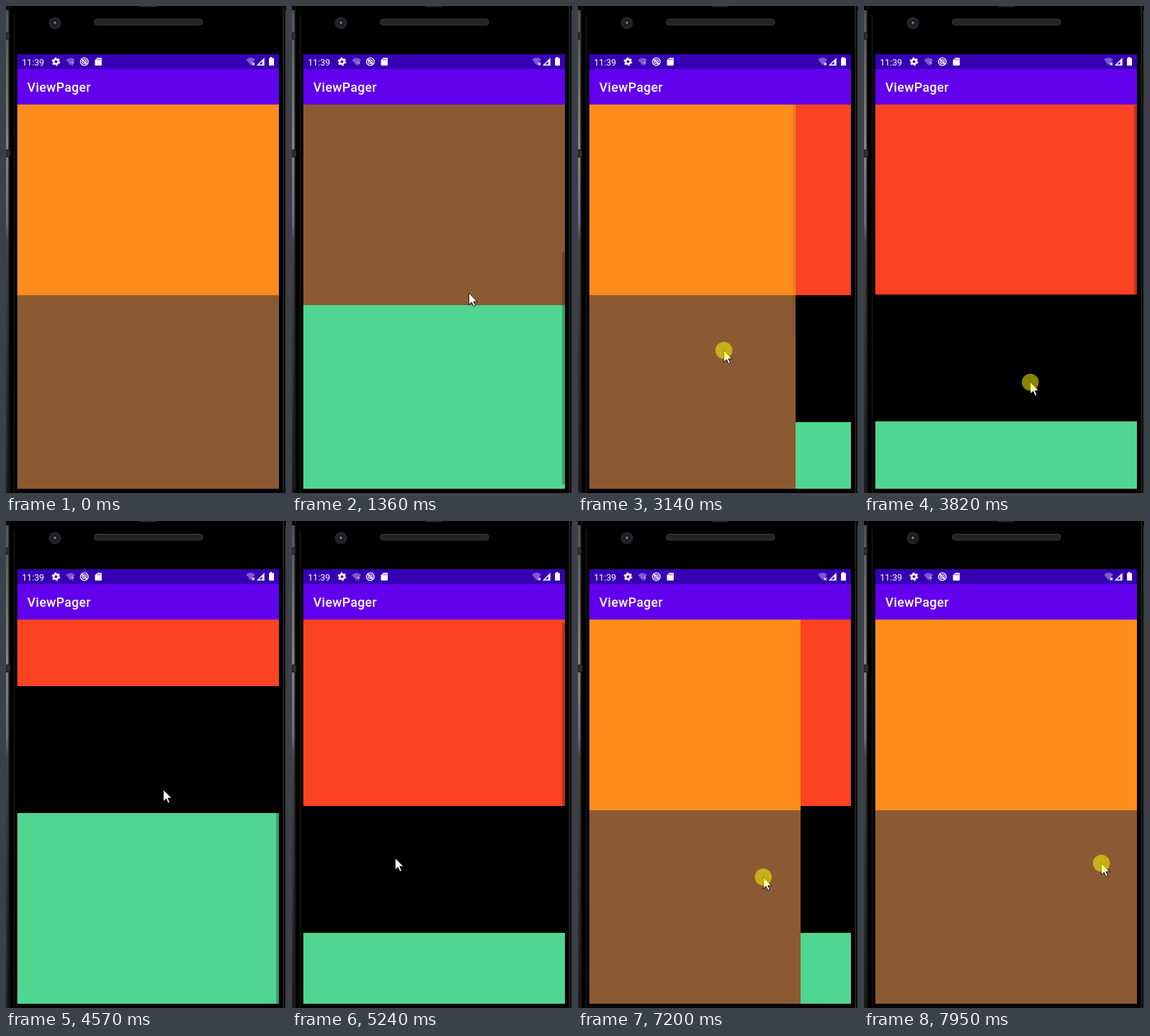
Recreate the animation shown at these times as an HTML page. Size 395x687 px, loop 8000 ms.

```html
<!DOCTYPE html>
<html lang="en">
<head>
<meta charset="utf-8">
<title>ViewPager</title>
<style>
html, body { margin: 0; width: 100%; height: 100%; overflow: hidden; background: #000; }
svg { display: block; width: 395px; height: 687px; }
text { font-family: Roboto, sans-serif; fill: #fff; }
</style>
</head>
<body>
<svg viewBox="0 0 395 687">
  <defs>
    <linearGradient id="side" x2="0" y2="1">
      <stop offset="0" stop-color="#555"/>
      <stop offset=".28" stop-color="#858585"/>
      <stop offset=".44" stop-color="#6c6a7a"/>
      <stop offset=".48" stop-color="#444"/>
      <stop offset="1" stop-color="#1c1c1c"/>
    </linearGradient>
    <radialGradient id="lens">
      <stop offset="0" stop-color="#55555f"/>
      <stop offset=".35" stop-color="#16161c"/>
      <stop offset=".7" stop-color="#26262b"/>
      <stop offset="1" stop-color="#1b1b1e"/>
    </radialGradient>
    <clipPath id="screen"><path d="M16 139h369v542H16z"/></clipPath>
  </defs>

  <!-- phone body -->
  <rect width="395" height="687"/>
  <rect y="6" width="3.5" height="681" fill="url(#side)"/>
  <path d="M4.5 0V687M11.5 12V687" stroke="#202020"/>
  <path d="M0 38h5v9H0zM0 203h6v10H0z" fill="#303030" stroke="#111"/>
  <path d="M391.5 0V687" stroke="#242424" stroke-width="2"/>
  <path d="M394.5 6V687" stroke="#3c3c3c"/>
  <rect x="189" width="23" height="1.5" fill="#2a2a2a"/>
  <circle cx="69" cy="24" r="9" fill="url(#lens)"/>
  <circle cx="69" cy="23.500" r="1.3" fill="#9a9aa4"/>
  <rect x="124.5" y="18.500" width="153" height="8.500" rx="4" fill="#242424" stroke="#3a3a3a"/>

  <!-- bars -->
  <rect x="16" y="68" width="369" height="21" fill="#3700b3"/>
  <rect x="16" y="89" width="369" height="50" fill="#6200ee"/>
  <text x="22.500" y="83.500" font-size="12.600">11:39</text>
  <text x="30" y="121" font-size="18" font-weight="500" letter-spacing=".35">ViewPager</text>

  <!-- status icons -->
  <g fill="none" stroke="#fff">
    <circle cx="70.500" cy="78.500" r="3.300" stroke-width="2.600"/>
    <circle cx="70.500" cy="78.500" r="5.200" stroke-width="1.600" stroke-dasharray="2.700 2.745"/>
    <circle cx="110.500" cy="78.500" r="5.400" stroke-width="1.400"/>
    <circle cx="110.500" cy="78.500" r="2.700" stroke-width="1.200"/>
    <path d="M107 75l7 7" stroke-width="1.500"/>
  </g>
  <path d="M84.500 76Q91 70.500 97.500 76L91 84z" fill="#fff" opacity=".35"/>
  <text x="92" y="84" font-size="8" font-weight="500">?</text>
  <path d="M129 73h5q1 0 1 1v9q0 1-1 1h-7.500q-1 0-1-1v-6.500z" fill="#fff"/>
  <path d="M129 74.500v2M131 74.500v2M133 74.500v2" stroke="#3700b3" stroke-width=".9"/>
  <path d="M338.500 75.500Q345 70 351.500 75.500L345 83.500z" fill="#fff" opacity=".35"/>
  <path d="M347 80l3.500 3.500m0-3.500L347 83.500" stroke="#fff" stroke-width="1.200"/>
  <path d="M364.500 73V84H353.500z" fill="#fff"/>
  <path d="M361.500 78v4.500H357z" fill="#3700b3"/>
  <path d="M371 73.500h1.500V72h3v1.500H378V84h-7z" fill="#fff"/>

  <g id="pages" clip-path="url(#screen)"></g>

  <path id="arrow" d="M0 0V16.500L3.900 12.900 6.600 19 9.200 17.900 6.500 12H11.800z" fill="#fff" stroke="#000" stroke-width=".9"/>
  <circle id="touch" r="12" fill="#ff0" opacity=".52"/>
</svg>

<script>
const LOOP = 8000, TOP = 139, LEFT = 16, VIEW_W = 369, VIEW_H = 542;
const DP = VIEW_W / 411.43;                // pixels per Android dp
const SLOP = 8, SETTLE = 420, BAR_DELAY = 300, BAR_FADE = 250;

const $ = id => document.getElementById(id);
const clamp = (v, lo, hi) => Math.min(hi, Math.max(lo, v));
const mix = (a, b, k) => a + (b - a) * k;
const easeOut = k => 1 - (1 - clamp(k, 0, 1)) ** 4;
const move = (el, x, y) => el.setAttribute("transform", `translate(${x} ${y})`);

function add(parent, tag, attrs = {}) {
  const el = document.createElementNS("http://www.w3.org/2000/svg", tag);
  for (const key in attrs) el.setAttribute(key, attrs[key]);
  return parent.appendChild(el);
}

function makePage(...blocks) {
  const el = add($("pages"), "g"), content = add(el, "g");
  let total = 0;
  for (const [fill, dp] of blocks) {
    const height = dp * DP;
    add(content, "rect", { y: total, width: VIEW_W, height, fill, "shape-rendering": "crispEdges" });
    total += height;
  }
  const thumb = add(el, "rect", { x: VIEW_W - 4, width: 4, height: VIEW_H ** 2 / total });
  return { el, content, thumb, total, axis: 1, max: total - VIEW_H };
}

const first = makePage(["#ff8c1b", 300], ["#8b5a32", 400], ["#50d690", 300]);
const second = makePage(["#fb4223", 300], ["#000", 200], ["#50d690", 300]);
const pager = { axis: 0, max: VIEW_W };

// Each drag: what it moves, start and end time, start and end point, resting value after release.
const drag = (what, start, end, from, to, rest) => ({ what, start, end, from, to, rest });
const drags = [
  drag(first, 740, 1150, [266, 498], [255, 296], first.max),
  drag(first, 2000, 2250, [247, 456], [284.5, 639], 0),
  drag(pager, 2930, 3280, [292, 490], [149, 483], VIEW_W),
  drag(second, 3800, 4200, [235, 540], [228, 362], second.max),
  drag(second, 4640, 5000, [222, 379], [205, 556]),
  drag(pager, 5440, 5800, [143, 472], [300, 478], VIEW_W),
  drag(pager, 6180, 6380, [178, 476], [497, 537], 0),
  drag(pager, 7070, 7250, [340, 495], [232, 505], 0),
  drag(pager, 7810, LOOP, [179, 508], [389, 474])
];

// The pointer follows drags in a straight line and glides from one to the next.
function pointerAt(t) {
  let last = { end: 70, to: [336, 700] };
  for (const d of drags) {
    const pressed = t >= d.start;
    if (t < d.end) {
      const [a, b, k] = pressed
        ? [d.from, d.to, (t - d.start) / (d.end - d.start)]
        : [last.to, d.from, easeOut((t - last.end) / (d.start - last.end))];
      return { x: mix(a[0], b[0], k), y: mix(a[1], b[1], k), pressed };
    }
    last = d;
  }
}

// Replays all drags up to t to find each offset and scrollbar opacity.
function updateOffsets(t) {
  for (const what of [first, second, pager]) what.value = what.bar = 0;
  for (const { what, start, end, from, to, rest } of drags) {
    if (t < start) break;
    const k = Math.min(1, (t - start) / (end - start));
    const travel = (to[what.axis] - from[what.axis]) * k;
    const moved = Math.sign(travel) * Math.max(0, Math.abs(travel) - SLOP);
    what.value = clamp(what.value - moved, 0, what.max);
    let done = end;
    if (rest !== undefined) {
      what.value = mix(what.value, rest, easeOut((t - end) / SETTLE));
      done += SETTLE;
    }
    what.bar = clamp(1 - (t - done - BAR_DELAY) / BAR_FADE, 0, 1);
  }
}

function draw(t) {
  updateOffsets(t);
  [first, second].forEach((page, i) => {
    move(page.el, LEFT + i * VIEW_W - pager.value, TOP);
    move(page.content, 0, -page.value);
    page.thumb.setAttribute("y", page.value * VIEW_H / page.total);
    page.thumb.setAttribute("opacity", page.bar * .25);
  });
  const { x, y, pressed } = pointerAt(t);
  move($("arrow"), x, y);
  move($("touch"), x, y);
  $("touch").style.display = pressed ? "" : "none";
}

const begin = performance.now();
function frame() {
  draw((performance.now() - begin) % LOOP);
  requestAnimationFrame(frame);
}
frame();
</script>
</body>
</html>
```
